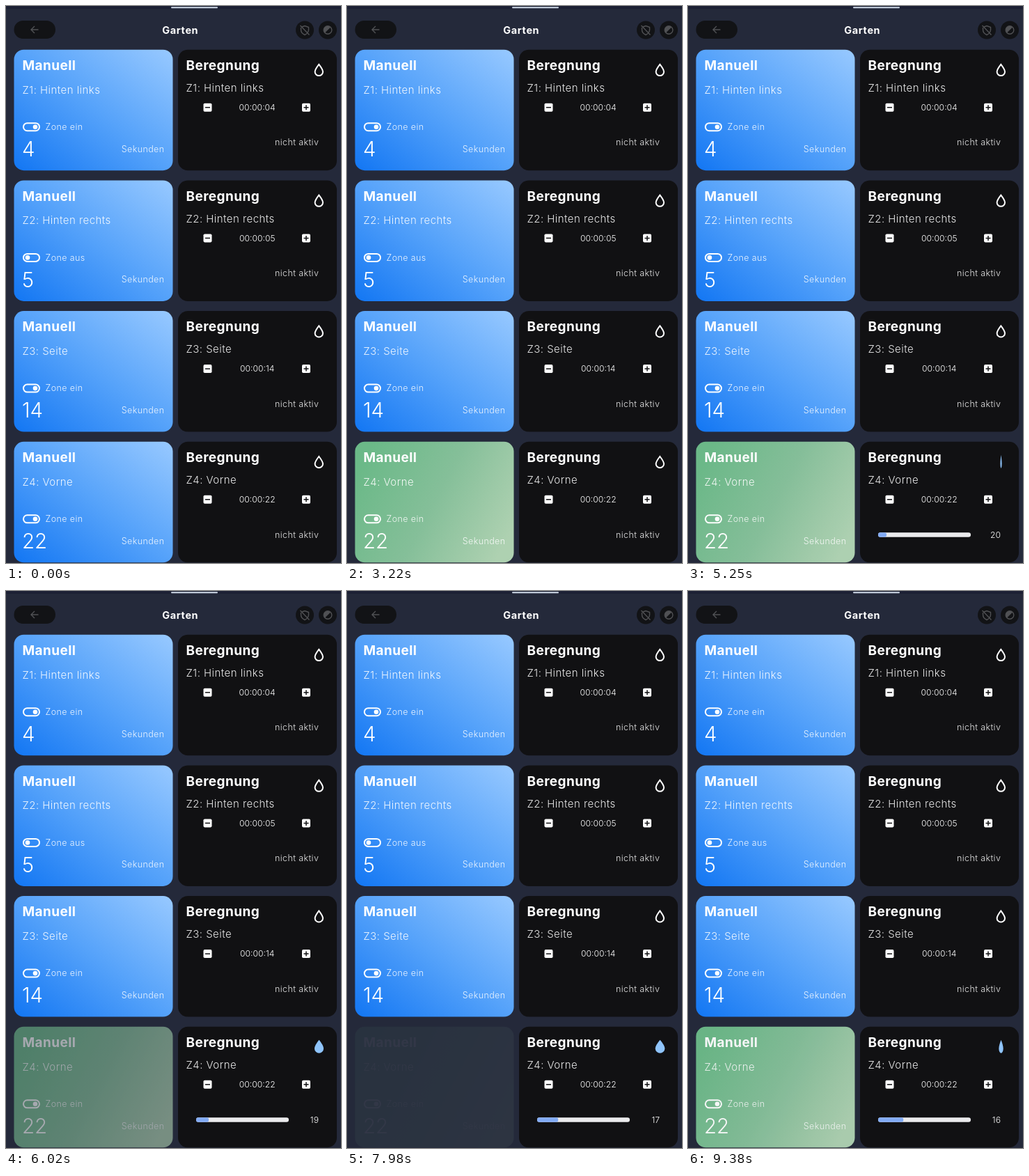
Recreate the animation shown at these times as an HTML page. Size 481 by 800 pixels, loop 9.45 s.

```html
<!DOCTYPE html>
<html lang="de">
<head>
<meta charset="utf-8">
<title>Garten</title>
<style>
html, body { margin: 0; width: 100%; height: 100%; overflow: hidden; background: #24293a; }
svg { display: block; width: 100%; height: 100%; font-family: Montserrat, Inter, "Open Sans", sans-serif; fill: #fff; }
.title { font-size: 14.5px; font-weight: 700; letter-spacing: .6px; }
.head { font-size: 19px; font-weight: 700; letter-spacing: .4px; }
.sub { font-size: 15px; font-weight: 300; letter-spacing: .45px; fill-opacity: .9; }
.small { font-size: 12.5px; font-weight: 300; letter-spacing: .4px; fill-opacity: .9; }
.time { font-size: 12.2px; font-weight: 300; }
.big { font-size: 29.5px; font-weight: 300; }
.mid { text-anchor: middle; }
.end { text-anchor: end; }
.line { fill: none; stroke: #fff; stroke-width: 2; }
.gray { fill: none; stroke: #505154; stroke-width: 1.4; }
</style>
</head>
<body>
<svg id="stage" viewBox="0 0 481 800">
  <defs>
    <linearGradient id="blue" x1="0" y1="1" x2="1" y2="0">
      <stop offset="0" stop-color="#1276f3"/>
      <stop offset=".5" stop-color="#55a2fa"/>
      <stop offset="1" stop-color="#98c9ff"/>
    </linearGradient>
    <linearGradient id="green" x1="0" y1=".3" x2="1" y2=".7">
      <stop offset="0" stop-color="#6cba89"/>
      <stop offset=".5" stop-color="#86c09a"/>
      <stop offset="1" stop-color="#afd2b2"/>
    </linearGradient>
  </defs>
  <rect width="481" height="800" fill="#24293a"/>
  <rect width="481" height="4" fill="#1c2034"/>
  <rect x="237" y="1.300" width="67" height="2" rx="1" fill="#d3deec"/>
  <g fill="#121316">
    <rect x="11.500" y="21" width="59.500" height="26" rx="13"/>
    <circle cx="429" cy="34.500" r="13"/>
    <circle cx="462" cy="34.500" r="13"/>
  </g>
  <path class="gray" d="M46.500 34H36M41 29L36 34L41 39"/>
  <path class="gray" d="M425 30L429 28.500L434.500 30.500V34.500Q434 39 429 41.500Q423.500 39 423.500 34V31M422.500 28L435.500 41.500"/>
  <circle class="gray" cx="462" cy="34.500" r="5.800"/>
  <path fill="#505154" d="M457.900 38.600A5.800 5.800 0 0 1 466.100 30.400Z"/>
  <text class="title mid" x="250.300" y="40">Garten</text>
  <g id="cards"></g>
</svg>
<script>
const LOOP = 9450, BEAT = 1050;
const PRESS = 980, RELEASE = 2030, START = 3215, TIMER = 3710;
const SECONDS = 22, BAR = 133;
const zones = [
  ["Hinten links", 4, true],
  ["Hinten rechts", 5, false],
  ["Seite", 14, true],
  ["Vorne", 22, true]
];
const DROP = "M0 -9.500C-4 -4.500 -6.800 -.5 -6.800 2.900A6.800 6.600 0 0 0 6.800 2.900C6.800 -.5 4 -4.500 0 -9.500Z";
const DROP_LINE = "M0 -7.800C-3.500 -3.300 -5.700 0 -5.700 2.900A5.700 5.500 0 0 0 5.700 2.900C5.700 0 3.500 -3.300 0 -7.800Z";

const text = (cls, x, y, s, id = "") => `<text class="${cls}" x="${x}" y="${y}"${id && ` id="${id}"`}>${s}</text>`;

const button = (x, sign) =>
  `<rect x="${x - 6}" y="77" width="12" height="12" rx="1.8"/>
   <path d="M${x - 3.5} 83h7${sign === "+" ? `M${x} 79.500v7` : ""}" stroke="#111113" stroke-width="1.500"/>`;

function manual([name, sec, on], i) {
  return `<g id="manual${i}">
    <rect id="face${i}" x="11.500" width="228" height="173.500" rx="14" fill="url(#blue)"/>
    ${text("head", 23.5, 29.3, "Manuell")}
    ${text("sub", 23.5, 63, `Z${i + 1}: ${name}`)}
    <rect class="line" x="25" y="105.500" width="23" height="11" rx="5.500"/>
    <circle cx="${on ? 42 : 31}" cy="111" r="3.300"/>
    ${text("small", 56.5, 115.3, on ? "Zone ein" : "Zone aus")}
    ${text("big", 23, 153.3, sec)}
    ${text("small end", 227.5, 147, "Sekunden")}
  </g>`;
}

function sprinkler([name, sec], i) {
  return `<rect x="247" width="228" height="173.500" rx="14" fill="#111113"/>
    ${text("head", 258.5, 29.3, "Beregnung")}
    ${text("sub", 258.5, 60.3, `Z${i + 1}: ${name}`)}
    ${button(289.5, "-")}${button(431, "+")}
    ${text("time mid", 360.7, 87.3, "00:00:" + String(sec).padStart(2, "0"))}
    <g id="idle${i}">
      <path class="line" transform="translate(449.300 29)" d="${DROP_LINE}"/>
      ${text("small end", 449.3, 137.8, "nicht aktiv")}
    </g>`;
}

const running = `<g id="run">
  <path id="drop" fill="#8fc4fb" d="${DROP}"/>
  <rect x="273" y="130.500" width="${BAR}" height="6.500" rx="3.200" fill="#ebebed"/>
  <rect id="fill" x="273" y="130.500" height="6.500" rx="3" fill="#82abf5"/>
  ${text("time end", 449, 137.8, "", "count")}
</g>`;

const $ = id => document.getElementById(id);
$("cards").innerHTML = zones.map((z, i) =>
  `<g transform="translate(0 ${62.7 + i * 187.7})">${manual(z, i)}${sprinkler(z, i)}${i === 3 ? running : ""}</g>`
).join("");

const ui = {};
for (const id of ["manual3", "face3", "idle3", "run", "drop", "fill", "count"]) ui[id] = $(id);

const ramp = (t, from, length) => Math.min(1, Math.max(0, (t - from) / length));
const sine = p => .5 - .5 * Math.cos(Math.PI * p);

// cubic-bezier(.25, .1, .25, 1), solved by bisection
function ease(p) {
  const curve = (a, b, s) => 3 * a * s * (1 - s) ** 2 + 3 * b * s * s * (1 - s) + s ** 3;
  let low = 0, high = 1;
  for (let i = 0; i < 20; i++) {
    const mid = (low + high) / 2;
    if (curve(.25, .25, mid) < p) low = mid; else high = mid;
  }
  return curve(.1, 1, low);
}

function opacityAt(t) {
  if (t < START) return 1 - .18 * (ramp(t, PRESS, 490) - ramp(t, RELEASE, 140));
  const half = (t - START) / BEAT % 1 * 2;
  return half < 1 ? 1 - ease(half) : ease(half - 1);
}

function draw(t) {
  ui.manual3.setAttribute("opacity", opacityAt(t).toFixed(3));
  ui.face3.setAttribute("fill", t >= START ? "url(#green)" : "url(#blue)");

  const active = t >= TIMER;
  ui.idle3.style.display = active ? "none" : "";
  ui.run.style.display = active ? "" : "none";
  if (!active) return;

  const turns = (t - TIMER) / BEAT;
  const done = 1 + Math.floor(turns);
  const width = Math.abs(Math.cos(Math.PI * sine(turns % 1)));
  ui.drop.setAttribute("transform", `translate(449.500 28.500) scale(${width.toFixed(3)} 1)`);
  ui.fill.setAttribute("width", BAR * done / SECONDS);
  ui.count.textContent = SECONDS - done;
}

const begin = performance.now();
function tick() {
  draw((performance.now() - begin) % LOOP);
  requestAnimationFrame(tick);
}
tick();
</script>
</body>
</html>
```
